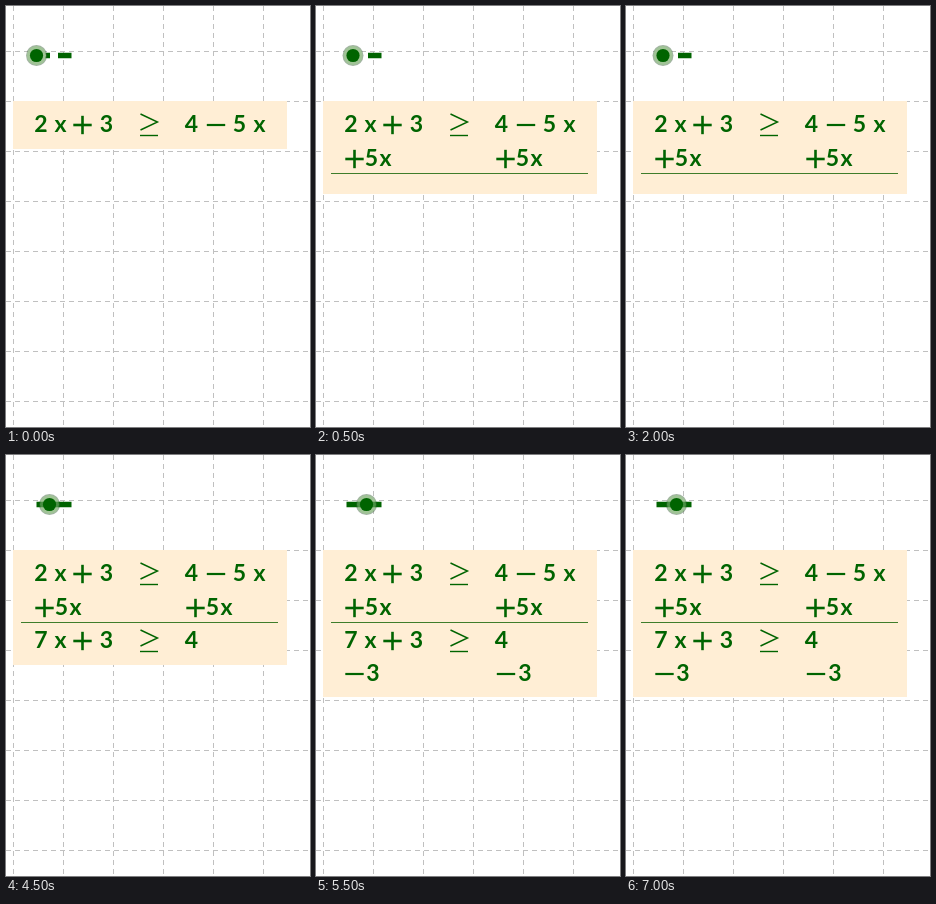
These frames come from a looping animation (304x421 px, 8000 ms). An HTML page with a canvas:

```html
<!DOCTYPE html>
<html lang="en">
<head>
<meta charset="utf-8">
<title>Solving an inequality</title>
<style>
  html, body { margin: 0; width: 100%; height: 100%; overflow: hidden; background: #fff; }
  canvas { display: block; }
</style>
</head>
<body>
<canvas width="304" height="421"></canvas>
<script>
const ctx = document.querySelector('canvas').getContext('2d');
const GREEN = '#006400';
const LOOP = 8000;
const STEPS = [
  { start: 0, knob: 30.5, bottom: 143 },
  { start: 500, knob: 37, bottom: 188 },
  { start: 3000, knob: 43.5, bottom: 210 },
  { start: 5500, knob: 50.5, bottom: 242 },
];
// Each row: step at which it appears, baseline, and [symbol, centre x] pairs.
const ROWS = [
  [0, 125.5, [['2', 35], ['x', 54.5], ['+', 76.5], ['3', 100.5], ['≥', 143], ['4', 185.5], ['−', 210], ['5', 233.5], ['x', 253.5]]],
  [1, 159.5, [['+', 38.5], ['5', 55.5], ['x', 69.5], ['+', 189.5], ['5', 206.5], ['x', 220.5]]],
  [2, 192.5, [['7', 35], ['x', 54.5], ['+', 76.5], ['3', 100.5], ['≥', 143], ['4', 185.5]]],
  [3, 225.5, [['−', 38.5], ['3', 57], ['−', 190], ['3', 209]]],
];

function stroke(points, color, width, dash = []) {
  ctx.beginPath();
  points.forEach(([x, y], i) => i ? ctx.lineTo(x, y) : ctx.moveTo(x, y));
  ctx.strokeStyle = color;
  ctx.lineWidth = width;
  ctx.setLineDash(dash);
  ctx.stroke();
}

function circle(x, y, r, color) {
  ctx.beginPath();
  ctx.arc(x, y, r, 0, 2 * Math.PI);
  ctx.fillStyle = color;
  ctx.fill();
}

function drawGrid() {
  for (let x = 7.5; x < 304; x += 50) stroke([[x, 0], [x, 421]], '#c0c0c0', 1, [5, 4]);
  for (let y = 45.5; y < 421; y += 50) stroke([[0, y], [304, y]], '#c0c0c0', 1, [5, 4]);
}

function drawSlider(step) {
  stroke([[30.5, 49.5], [65.5, 49.5]], GREEN, 5.5, step < 2 ? [13.5, 8] : []);
  const x = STEPS[step].knob;
  circle(x, 49.5, 10.5, 'rgba(70, 105, 70, .5)');
  circle(x, 49.5, 9.5, '#a0c496');
  if (step > 1) stroke([[x - 10, 49.5], [x + 10, 49.5]], 'rgba(0, 100, 0, .55)', 5.5);
  circle(x, 49.5, 6.6, GREEN);
}

function drawSymbol(symbol, x, baseline) {
  const axis = baseline - 6.5;
  if (symbol === '≥') {
    stroke([[x - 8.5, baseline - 17.5], [x + 8.5, baseline - 9.5], [x - 8.5, baseline - 1.5]], GREEN, 1.4);
    stroke([[x - 9, baseline + 4], [x + 9, baseline + 4]], GREEN, 1.4);
  } else if (symbol === '+' || symbol === '−') {
    stroke([[x - 9.2, axis], [x + 9.2, axis]], GREEN, symbol === '+' ? 2.6 : 2.2);
    if (symbol === '+') stroke([[x, axis - 9.2], [x, axis + 9.2]], GREEN, 2.6);
  } else {
    ctx.fillStyle = GREEN;
    ctx.fillText(symbol, x, baseline);
  }
}

function draw(step) {
  ctx.fillStyle = '#fff';
  ctx.fillRect(0, 0, 304, 421);
  drawGrid();
  drawSlider(step);
  ctx.fillStyle = '#ffeed5';
  ctx.fillRect(7, 95, 274, STEPS[step].bottom - 95);
  ctx.font = 'bold 23px Lato, sans-serif';
  ctx.textAlign = 'center';
  for (const [from, baseline, symbols] of ROWS) {
    if (step >= from) symbols.forEach(([symbol, x]) => drawSymbol(symbol, x, baseline));
  }
  if (step > 0) stroke([[15, 167.5], [272, 167.5]], '#3f7d2b', 1.2);
}

function tick() {
  const time = performance.now() % LOOP;
  draw(STEPS.findLastIndex(({ start }) => time >= start));
  requestAnimationFrame(tick);
}
tick();
</script>
</body>
</html>
```
